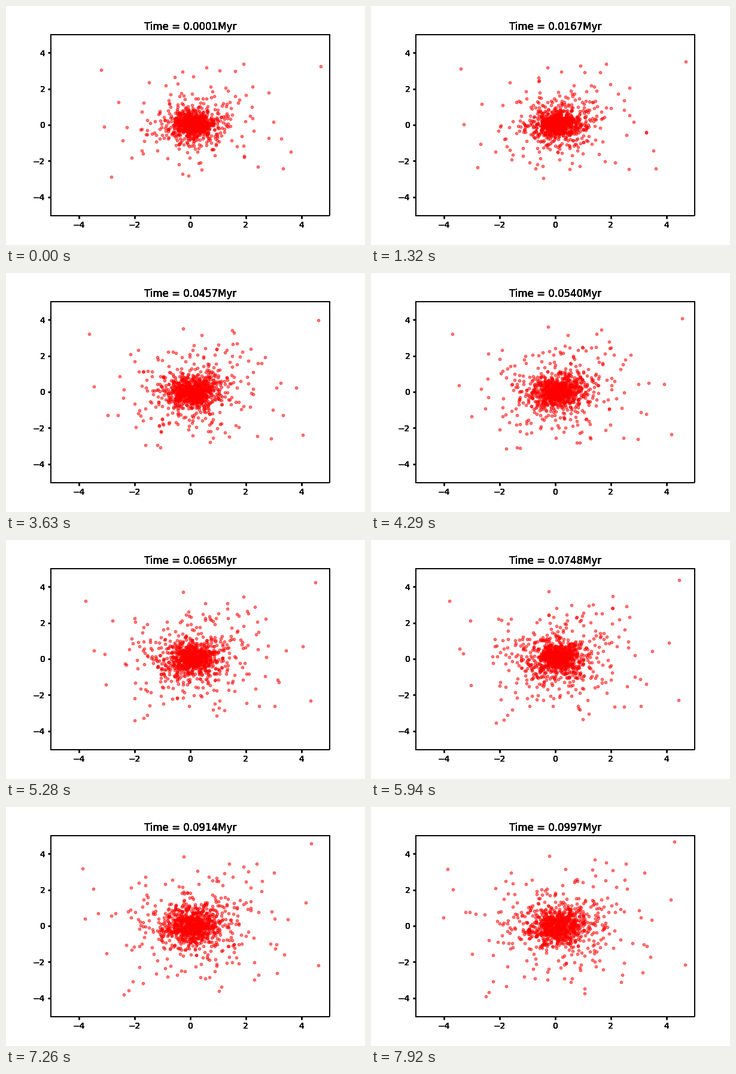
These frames come from a looping animation (600x400 px, 8000 ms). A matplotlib script:

```python
import numpy as np
import matplotlib.pyplot as plt
from matplotlib.animation import FuncAnimation

plt.rcParams.update({"font.family": "DejaVu Sans", "font.size": 10,
                     "axes.linewidth": 1.4})

STEPS = 25            # poses in one loop
HOLD = 330            # ms per pose
TICK = 20             # ms per animation frame
LOOP = 8000
STARS = 1000
GM = 0.065            # cluster mass in plot units and steps
CORE = 0.5            # core radius
SWELL = 0.6           # growth of the core over the loop


def isotropic(rng, n):
    v = rng.normal(size=(n, 3))
    return v / np.linalg.norm(v, axis=1, keepdims=True)


def depth(pos):
    return np.sqrt((pos ** 2).sum(axis=1, keepdims=True) + CORE ** 2)


def pull(pos):
    return -GM * pos / depth(pos) ** 3


def plummer(rng):
    """Positions and bound velocities of a relaxed star cluster."""
    mass = (np.arange(STARS) + rng.random(STARS)) / STARS * 0.99
    r = CORE / np.sqrt(np.maximum(mass, 1e-4) ** (-2 / 3) - 1)
    pos = r[:, None] * isotropic(rng, STARS)
    well = GM / depth(pos)
    vel = np.sqrt(well / 6) * rng.normal(size=pos.shape)
    speed = np.linalg.norm(vel, axis=1, keepdims=True)
    vel *= np.minimum(1, 0.85 * np.sqrt(2 * well) / speed)
    return pos, vel


def orbits(sub=12):
    """Leapfrog through the poses; the core slowly swells."""
    pos, vel = plummer(np.random.default_rng(11))
    dt = 1 / sub
    poses = []
    for step in range(STEPS):
        r2 = (pos ** 2).sum(axis=1, keepdims=True)
        grow = 1 + SWELL * step / (STEPS - 1) / (1 + 0.3 * r2)
        poses.append((pos * grow)[:, :2] + (0.1, 0.02))
        for _ in range(sub):
            vel = vel + 0.5 * dt * pull(pos)
            pos = pos + dt * vel
            vel = vel + 0.5 * dt * pull(pos)
    return poses


poses = orbits()

fig = plt.figure(figsize=(6, 4), dpi=100, facecolor="white")
ax = fig.add_axes([0.125, 0.125, 0.775, 0.755])
for side in ("right", "bottom"):
    ax.spines[side].set_position(("outward", 0.72))
ax.set(xlim=(-5, 5), ylim=(-5, 5))
ticks = range(-4, 5, 2)
ax.set_xticks(ticks)
ax.set_yticks(ticks)
ax.tick_params(width=2, length=3.5, labelbottom=False, labelleft=False)


def heavy(text, xy, coords, shift, size=10, **align):
    """Text laid over itself, which darkens its soft edges."""
    return [ax.annotate(text, xy, xycoords=coords, xytext=shift,
                        textcoords="offset points", fontsize=size, **align)
            for _ in range(6)]


for v in ticks:
    name = str(v).replace("-", "\u2212")
    heavy(name, (v, 0), ("data", "axes fraction"), (0, -7),
          ha="center", va="top")
    heavy(name, (0, v), ("axes fraction", "data"), (-7, 0),
          ha="right", va="center_baseline")

titles = heavy("", (0.5, 1), "axes fraction", (0.3, 6), 12,
               ha="center", va="baseline")
stars = ax.scatter(*poses[0].T, s=10, c="red", alpha=0.5)


def update(frame):
    step = min((frame * TICK + TICK // 2) // HOLD, STEPS - 1)
    stars.set_offsets(poses[step])
    time = (1 + int(41.5 * step)) / 10000
    for title in titles:
        title.set_text(f"Time = {time:.4f}Myr")
    return [stars, *titles]


anim = FuncAnimation(fig, update, frames=LOOP // TICK, interval=TICK,
                     repeat=True, repeat_delay=0)
plt.show()
```
